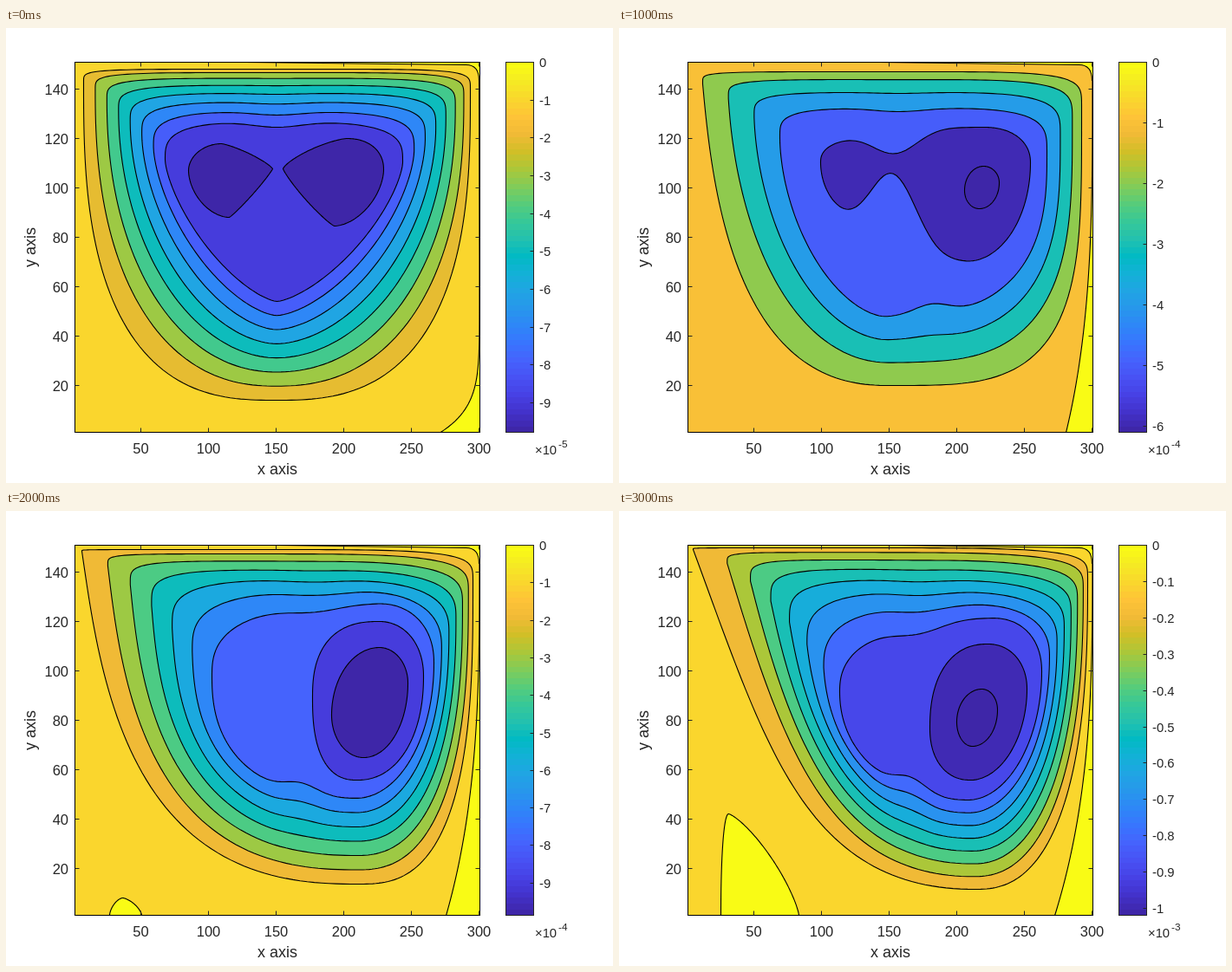
Write an HTML page with a canvas that moves like this. It is 700 px wide and 525 px high and loops after 4000 ms.

```html
<!DOCTYPE html>
<html lang="en">
<head>
<meta charset="utf-8">
<title>Contour plot</title>
<style>
html, body { margin: 0; width: 100%; height: 100%; overflow: hidden; background: #fff; }
canvas { display: block; width: 700px; height: 525px; }
</style>
</head>
<body>
<canvas id="stage" width="700" height="525"></canvas>
<script>
const ctx = document.getElementById('stage').getContext('2d');
const INK = '#262626';
const BOX = { l: 79.5, t: 39.5, r: 546.5, b: 466.5 };
const BAR = { l: 576.5, r: 608.5 };
const W = BOX.r - BOX.l, H = BOX.b - BOX.t;
const HOLD = 1000;
const SIDES = 240;

// Colour map: every third entry of 64.
const STOPS = ['3e26a8', '4332cb', '4741e5', '4852f4', '4563fd', '3875fe', '2e87f7', '2797eb',
  '20a5e3', '12b1d6', '02bac3', '24c1ae', '37c897', '57cc7a', '81cc59', 'abc739', 'd1bf27',
  'f0ba36', 'fec338', 'fad62d', 'f5e924', 'f9fb15']
  .map(h => [0, 2, 4].map(i => parseInt(h.slice(i, i + 2), 16)));

const mix = (a, b, f) => a + (b - a) * f;

function entry(i) {
  const k = Math.min(20, Math.floor(i / 3)), f = i / 3 - k;
  return 'rgb(' + STOPS[k].map((c, n) => Math.round(mix(c, STOPS[k + 1][n], f))) + ')';
}
const shade = (level, min) =>
  entry(Math.max(0, Math.min(63, Math.floor((1 - level / min) * 64))));

// A loop through four extreme points; n holds the squareness of its
// corners: top left, top right, bottom right, bottom left.
const egg = (left, top, right, bottom, n = [2, 2, 2, 2]) => ({ left, top, right, bottom, n });

// Rings 1..count blend from outer to inner. Dips are [x, width, depth].
const plots = [
  {
    min: 9.78, exp: -5, unit: 1, count: 8, grow: 1, lean: 0,
    outer: egg([89, 64], [311, 47], [535, 75], [311, 429], [6, 6, 2.7, 2.7]),
    inner: egg([183, 152], [312, 108], [457, 155], [312, 315], [3.3, 3.4, 1.45, 1.45]),
    topDip: [312, 40, 6],
    caps: [
      { level: 9, ...egg([210, 164], [248, 133], [307, 162], [257, 218], [1.95, 1.25, 1.1, 1.8]) },
      { level: 9, ...egg([319, 162], [392, 127], [435, 163], [378, 228], [1.35, 2.2, 1.75, 1.15]) }
    ],
    edge: { from: 276, top: 265, foot: 500, pow: 7 }
  },
  {
    min: 6.1, exp: -4, unit: 1, count: 4, grow: 1, lean: 0.15,
    outer: egg([96, 64], [311, 50], [533, 95], [311, 412], [6, 5, 3.7, 2.3]),
    inner: egg([185, 127], [340, 92], [493, 145], [309, 333], [4.2, 3.8, 2.7, 1.75]),
    topDip: [322, 40, 4], bottomDip: [360, 30, 13],
    caps: [
      { level: 5, ...egg([232, 155], [420, 114], [474, 155], [400, 269], [2.6, 2.2, 2, 2]),
        topDip: [318, 36, 27], bottomDip: [316, 38, 86] },
      { level: 6, ...egg([398, 187], [420, 159], [438, 178], [415, 208]) }
    ],
    edge: { from: 300, top: 60, foot: 515, pow: 3.2 }
  },
  {
    min: 9.86, exp: -4, unit: 1, count: 7, grow: 0.9, lean: 0.18,
    outer: egg([87, 46], [250, 44], [538, 85], [405, 430], [7, 5, 2.8, 2.4]),
    inner: egg([237, 190], [427, 106], [493, 175], [403, 331], [2.7, 2.2, 2, 2.4]),
    topDip: [355, 45, 8], bottomDip: [340, 28, 12],
    caps: [
      { level: 8, ...egg([353, 215], [430, 127], [481, 190], [405, 310], [2.5, 2.1, 2.15, 2.5]) },
      { level: 9, ...egg([375, 235], [430, 157], [463, 198], [412, 284]) }
    ],
    edge: { from: 313, top: 60, foot: 507, pow: 3 },
    bump: egg([119, 466], [134, 446], [156, 466], [134, 470], [1.6, 1.5, 2, 2])
  },
  {
    min: 10.19, exp: -3, unit: 0.1, count: 8, grow: 0.75, lean: 0.45,
    outer: egg([85, 44], [230, 42], [540, 82], [410, 436], [7, 5, 2.5, 2.1]),
    inner: egg([254, 208], [430, 123], [487, 185], [402, 333], [2.4, 2.2, 1.95, 2.1]),
    topDip: [345, 40, 12], bottomDip: [336, 26, 15],
    caps: [
      { level: 9, ...egg([358, 250], [425, 153], [470, 205], [405, 310], [2.3, 2.1, 1.95, 2.2]) },
      { level: 10, ...egg([389, 243], [418, 205], [436, 229], [407, 271]) }
    ],
    edge: { from: 319, top: 60, foot: 502, pow: 2.9 },
    bump: egg([117, 466], [126, 349], [207, 466], [126, 470], [2.2, 1.3, 2, 2])
  }
];

function dip(d, x) {
  return d ? d[2] * Math.exp(-(((x - d[0]) / d[1]) ** 2)) : 0;
}

function outline(e) {
  const path = new Path2D();
  for (let i = 0; i < SIDES; i++) {
    const a = i / SIDES * 2 * Math.PI, c = Math.cos(a), s = Math.sin(a);
    const up = s >= 0, west = c < 0;
    const side = west ? e.left : e.right, pole = up ? e.top : e.bottom;
    const n = e.n[up ? (west ? 0 : 1) : (west ? 3 : 2)];
    const k = (Math.abs(c) ** n + Math.abs(s) ** n) ** (-1 / n);
    const v = k * Math.abs(s);
    let u = k * Math.abs(c);
    if (west && !up) u -= (e.lean || 0) * v * (1 - v);
    const x = mix(pole[0], side[0], u);
    const y = mix(side[1], pole[1], v) + (up ? dip(e.topDip, x) : -dip(e.bottomDip, x));
    path.lineTo(x, y);
  }
  path.closePath();
  return path;
}

function ringAt(p, t) {
  const blend = (name, px, py) =>
    [px, py].map((pow, c) => mix(p.outer[name][c], p.inner[name][c], t ** pow));
  const fade = d => d && [d[0], d[1], d[2] * t ** 3];
  return {
    left: blend('left', p.grow, 1.2),
    top: blend('top', 1, 1.4),
    right: blend('right', 1.2, 1.2),
    bottom: blend('bottom', 1, 1),
    n: p.outer.n.map((n, i) => mix(n, p.inner.n[i], t ** 0.6)),
    lean: p.lean * (1 - t),
    topDip: fade(p.topDip),
    bottomDip: fade(p.bottomDip)
  };
}

// Zero line: along the top, round the corner and down the right side.
function rim({ from, top, foot, pow }) {
  const path = new Path2D();
  path.moveTo(from, 39);
  path.lineTo(530, 42);
  path.quadraticCurveTo(545, 42, 545, 60);
  for (let i = 0; i <= 60; i++) {
    const h = i / 60;
    path.lineTo(mix(545.5, foot, h ** pow), mix(top, BOX.b, h));
  }
  return path;
}

for (const p of plots) {
  p.shapes = [];
  const add = (line, level, area = line) =>
    p.shapes.push({ line, area, fill: shade(level, p.min) });
  const line = rim(p.edge), area = new Path2D(line);
  area.lineTo(BOX.r, BOX.b);
  area.lineTo(BOX.r, BOX.t);
  add(line, 0, area);
  if (p.bump) add(outline(p.bump), 0);
  for (let v = 1; v <= p.count; v++) add(outline(ringAt(p, (v - 1) / (p.count - 1))), v + 1);
  for (const c of p.caps) add(outline(c), c.level + 1);
}

function text(s, x, y, size, align) {
  ctx.font = size + 'px "Liberation Sans", Arial, sans-serif';
  ctx.textAlign = align;
  ctx.fillStyle = INK;
  ctx.fillText(s, x, y);
}

function seg(x1, y1, x2, y2) {
  ctx.beginPath();
  ctx.moveTo(x1, y1);
  ctx.lineTo(x2, y2);
  ctx.stroke();
}

const snap = v => Math.floor(v) + 0.5;

function drawAxes() {
  ctx.strokeStyle = '#000';
  ctx.strokeRect(BOX.l, BOX.t, W, H);
  ctx.strokeStyle = INK;
  for (let v = 50; v <= 300; v += 50) {
    const x = snap(77.4 + v * 1.5613);
    seg(x, BOX.b, x, BOX.b - 5);
    seg(x, BOX.t, x, BOX.t + 5);
    text(v, x, 491, 16.5, 'center');
  }
  for (let v = 20; v <= 140; v += 20) {
    const y = snap(469.8 - v * 2.851);
    seg(BOX.l, y, BOX.l + 5, y);
    seg(BOX.r, y, BOX.r - 5, y);
    text(v, 72, y + 6, 16.5, 'right');
  }
  text('x axis', 313, 515, 18, 'center');
  ctx.save();
  ctx.translate(34, 253);
  ctx.rotate(-Math.PI / 2);
  text('y axis', 0, 0, 18, 'center');
  ctx.restore();
}

function drawBar(p) {
  for (let i = 0; i < 64; i++) {
    const y = Math.round(BOX.t + H * (63 - i) / 64);
    ctx.fillStyle = entry(i);
    ctx.fillRect(BAR.l, y, BAR.r - BAR.l, Math.round(BOX.t + H * (64 - i) / 64) - y);
  }
  ctx.strokeStyle = INK;
  ctx.strokeRect(BAR.l, BOX.t, BAR.r - BAR.l, H);
  for (let v = 0; v <= p.min; v++) {
    const y = snap(BOX.t + H * v / p.min);
    seg(BAR.r, y, BAR.r - 4, y);
    text(v ? '-' + +(v * p.unit).toFixed(1) : '0', 615, y + 5, 14.8, 'left');
  }
  text('×10', 610, 492, 14.8, 'left');
  text(p.exp, 637, 484, 11.8, 'left');
}

function draw(p) {
  ctx.fillStyle = '#fff';
  ctx.fillRect(0, 0, 700, 525);
  ctx.lineWidth = 1;
  ctx.save();
  ctx.beginPath();
  ctx.rect(BOX.l, BOX.t, W, H);
  ctx.clip();
  ctx.fillStyle = shade(1, p.min);
  ctx.fillRect(BOX.l, BOX.t, W, H);
  ctx.translate(0.5, 0.5);
  ctx.strokeStyle = '#000';
  ctx.lineWidth = 1.1;
  for (const s of p.shapes) {
    ctx.fillStyle = s.fill;
    ctx.fill(s.area);
    ctx.stroke(s.line);
  }
  ctx.restore();
  drawAxes();
  drawBar(p);
}

function tick() {
  draw(plots[Math.floor(performance.now() / HOLD) % plots.length]);
  requestAnimationFrame(tick);
}
tick();
</script>
</body>
</html>
```
